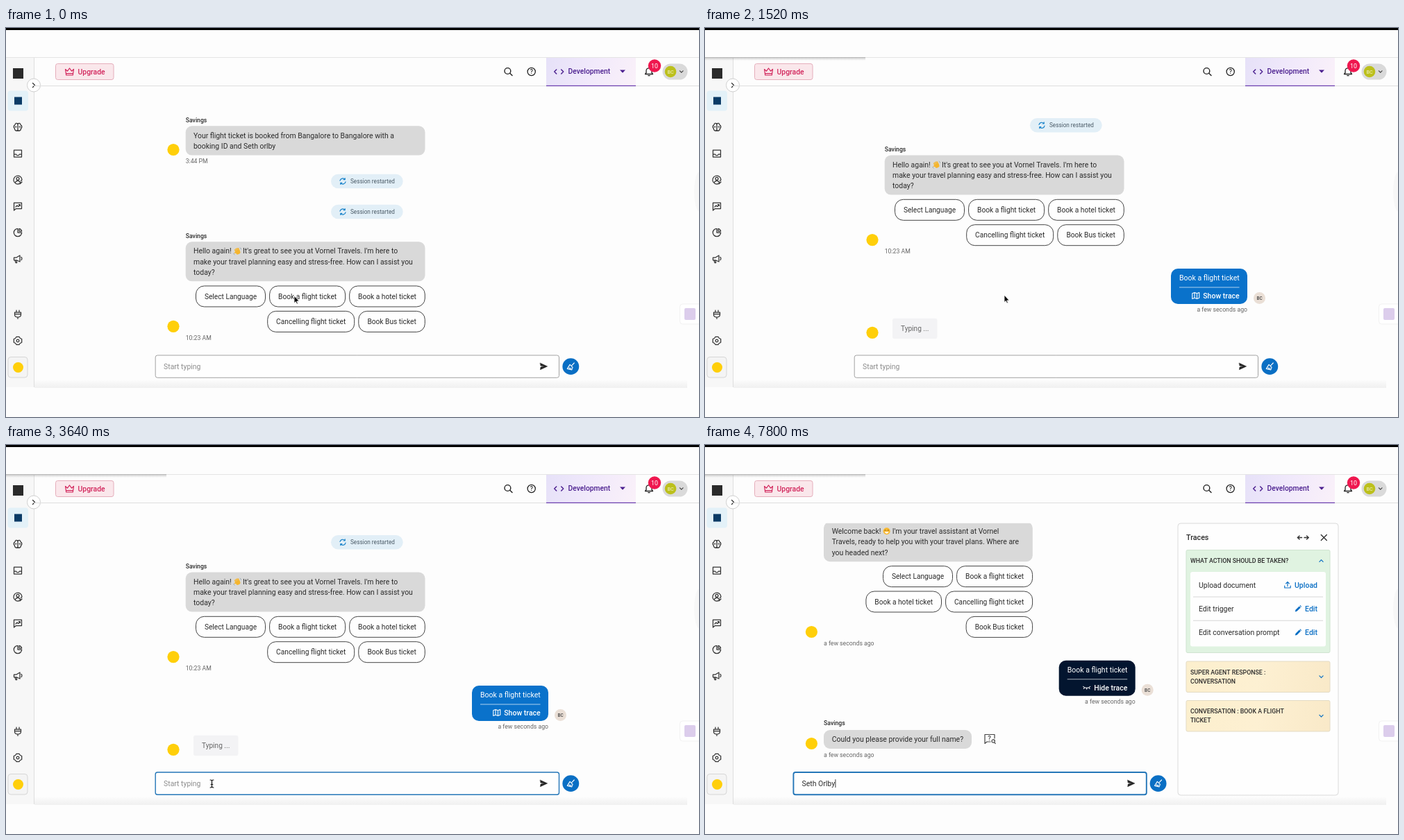
Animation of 998 by 561 pixels, one loop 8 s. Source, as an HTML page with a canvas:

```html
<!DOCTYPE html>
<html lang="en">
<head>
<meta charset="utf-8">
<title>Chat preview</title>
<style>
html, body { margin: 0; width: 100%; height: 100%; overflow: hidden; background: #fdfdfd; }
canvas { display: block; width: 998px; height: 561px; }
</style>
</head>
<body>
<canvas id="stage"></canvas>
<script>
const W = 998, H = 561, LOOP = 8000, STEP = 40;
const cv = document.getElementById('stage');
const c = cv.getContext('2d');
const dpr = window.devicePixelRatio || 1;
cv.width = W * dpr;
cv.height = H * dpr;

const INK = '#2b2b2b', GREY = '#666', BLUE = '#0a6fc4', YELLOW = '#ffcf0a', BUBBLE = '#d9d9d9';

// ---------- helpers ----------
function text(s, x, y, size, color = INK, weight = 400, align = 'left') {
  c.font = `${weight} ${size}px Roboto, sans-serif`;
  c.textAlign = align;
  c.fillStyle = color;
  c.fillText(s, x, y + size * 0.355);
  return c.measureText(s).width;
}
function box(x, y, w, h, r, fill, stroke, lw = 1) {
  c.beginPath();
  c.roundRect(x, y, w, h, r);
  if (fill) { c.fillStyle = fill; c.fill(); }
  if (stroke) { c.strokeStyle = stroke; c.lineWidth = lw; c.stroke(); }
}
function dot(x, y, r, fill, stroke, lw = 1) {
  c.beginPath();
  c.arc(x, y, r, 0, 7);
  if (fill) { c.fillStyle = fill; c.fill(); }
  if (stroke) { c.strokeStyle = stroke; c.lineWidth = lw; c.stroke(); }
}
function icon(d, x, y, stroke, lw = 1.2, fill) {
  const p = new Path2D(d);
  c.save();
  c.translate(x, y);
  c.lineJoin = c.lineCap = 'round';
  if (fill) { c.fillStyle = fill; c.fill(p); }
  if (stroke) { c.strokeStyle = stroke; c.lineWidth = lw; c.stroke(p); }
  c.restore();
}
function line(x1, y1, x2, y2, color, lw = 1) {
  c.beginPath();
  c.moveTo(x1, y1);
  c.lineTo(x2, y2);
  c.strokeStyle = color;
  c.lineWidth = lw;
  c.stroke();
}
function gradient(x1, y1, x2, y2, ...stops) {
  const g = c.createLinearGradient(x1, y1, x2, y2);
  stops.forEach((s, i) => g.addColorStop(i / (stops.length - 1), s));
  return g;
}

// ---------- page frame ----------
const NAV = [
  [143, 'M0-5.5V5.5M0-4C-1-6.5-4-6-4-3.2C-6.5-2.5-6.3 1-4.6 1.6C-5 4.5-1.5 6.5 0 4.2C1.5 6.5 5 4.5 4.6 1.6C6.3 1 6.5-2.5 4-3.2C4-6 1-6.5 0-4M-4-.5H-2M2-.5H4'],
  [181, 'M-5.5-5H5.5V5H-5.5ZM-5.5 1H-2.3C-2 3.4 2 3.4 2.3 1H5.5'],
  [219, 'M4.5 4A6 6 0 1 1 6 0L4.5 1.5M-2-1.7A2 2 0 1 1 2-1.7A2 2 0 1 1-2-1.7M-3.3 3.5C-2.5 .6 2.5 .6 3.3 3.5M3.5 5.5L6 3'],
  [257, 'M-5.5-5H5.5V3.5H-2.5L-5.5 6ZM-3 1L-1-1L.7 .6L3.2-2.2M1.3-2.4H3.3V-.4'],
  [295, 'M0-5.7A5.7 5.7 0 1 0 5.7 0H0ZM2-5.7A5 5 0 0 1 5.7-2H2Z'],
  [333, 'M-5.5-2H-2L3-5V4L-2 1.8H-5.5ZM-4 2L-3 5.5H-1.3L-2 2M5-2.5C6.2-1.5 6.2 .7 5 1.7'],
  [413, 'M-2-6V-3M2-6V-3M-4.5-3H4.5V.5C4.5 3 2 4 0 4C-2 4-4.5 3-4.5 .5ZM-4.5-.5H4.5M0 4V6.3'],
  [451, 'M-2-5.7H2L3.2-3.7L5.7-2.5V2.5L3.2 3.7L2 5.7H-2L-3.2 3.7L-5.7 2.5V-2.5L-3.2-3.7ZM-1.8 0A1.8 1.8 0 1 1 1.8 0A1.8 1.8 0 1 1-1.8 0']
];

function sidebar() {
  c.fillStyle = '#f7f7f7';
  c.fillRect(0, 43, 40, 475);
  line(40.5, 43, 40.5, 518, '#dedede');
  box(10, 58, 15, 15, 0, '#2a2a2a');
  box(2.5, 90.5, 29.5, 29, 4, '#e3f1f8');
  box(12, 99.5, 11, 11, 0, '#0b3b66');
  NAV.forEach(([y, d]) => icon(d, 17, y, '#333', 1.25));
  box(3, 474.5, 28, 29.5, 4, '#f4f4f4', '#d6d6d6');
  dot(17.5, 489.5, 7.5, YELLOW);
  dot(40, 82.5, 9.5, '#fff', '#cfcfcf');
  icon('M-1.5-3L1.5 0L-1.5 3', 40, 82.5, '#333', 1.3);
}

function header() {
  line(0, 42.5, W, 42.5, '#e4e4e4');
  line(40, 83.5, W, 83.5, '#dedede');
  box(71.5, 51.5, 83.5, 23, 3, '#fae7eb', '#e5aebb');
  icon('M-6-3.5L-3-.8L0-5L3-.8L6-3.5L4.8 5H-4.8ZM-4.6 2.6H4.6', 91.5, 63, '#d2265c', 1.2);
  text('Upgrade', 103.5, 63, 10.4, '#d2265c', 500);

  icon('M-5-1A4.4 4.4 0 1 1 3.8-1A4.4 4.4 0 1 1-5-1M2.7 2.3L6 5.6', 723, 63, '#222', 1.4);
  dot(756.7, 63, 5.6, null, '#222', 1.3);
  text('?', 756.7, 63.2, 8.5, '#222', 500, 'center');

  c.fillStyle = gradient(778, 43, 907, 83, '#e6e1f8', '#f1e9fb', '#faf1f9');
  c.fillRect(778, 43, 129, 40);
  line(778, 83.3, 907, 83.3, '#6b3fae', 1.2);
  icon('M-3.5-3L-6.5 0L-3.5 3M3.5-3L6.5 0L3.5 3', 796.2, 63, '#4b1f8f', 1.5);
  text('Development', 809.5, 62.7, 10.3, '#4b1f8f', 500);
  icon('M-4-2H4L0 2.2Z', 888, 62.5, null, 0, '#4b1f8f');

  icon('M-5.5 3.5H5.5L4 1.5V-1.5C4-6.3-4-6.3-4-1.5V1.5ZM-1.2 5.6H1.2', 926, 63, '#222', 1.3);
  dot(934, 54.5, 9.2, '#ef174f');
  text('10', 934, 54.5, 8.8, '#fff', 400, 'center');
  box(945.5, 51.5, 36, 23, 11.5, '#dadada');
  dot(957, 63, 8.3, '#bcc01c');
  text('BC', 957, 63, 7.2, '#f3f3d0', 400, 'center');
  icon('M-2.3-1.2L0 1.2L2.3-1.2', 972.7, 63, '#444', 1.2);
}

function frame(t) {
  c.fillStyle = '#fdfdfd';
  c.fillRect(0, 0, W, H);
  c.fillStyle = '#000';
  c.fillRect(0, 0, W, 3);
  c.fillStyle = gradient(0, 507, 0, 519, 'rgba(238,238,238,0)', '#f0f0f0');
  c.fillRect(41, 507, 940, 12);
  sidebar();
  header();
  if (t >= 40) {
    c.fillStyle = gradient(0, 42, 0, 47, 'rgba(120,120,120,.45)', 'rgba(160,160,160,0)');
    c.fillRect(0, 42, 231, 5);
  }
  c.beginPath();
  c.ellipse(999, 236, 8, 29, 0, 0, 7);
  c.fillStyle = '#f7f7f7';
  c.fill();
  box(970.5, 398, 32, 29, 4, '#fff', '#f1f1f1');
  box(977, 404, 16, 17, 2, '#dccdec');
}

// ---------- chat parts ----------
function wave(x, y) {
  c.save();
  c.translate(x, y);
  c.rotate(-0.45);
  box(-3, -1, 6.6, 6, 2.6, '#f5b52e');
  [-2.9, -1.1, 0.7, 2.3].forEach((fx, i) => box(fx, -4.6 + Math.abs(i - 1.4) * 0.6, 1.5, 5.5, 0.8, '#f5b52e'));
  box(-5, 0, 3.6, 1.7, 0.8, '#f5b52e');
  c.restore();
  icon('M4.2-4.8Q5.6-4 5.6-2.6M-5.2 3.4Q-5 4.8-3.8 5.3', x, y, '#7f97a5', 0.7);
}
function smile(x, y) {
  dot(x, y, 5, '#f8b92f');
  icon('M-3-1.2Q-2.1-2.6-1.2-1.2M1.2-1.2Q2.1-2.6 3-1.2', x, y, '#6b3d12', 0.8);
  icon('M-3 .7H3Q2.2 3.6 0 3.6Q-2.2 3.6-3 .7Z', x, y, null, 0, '#fff3df');
}

// Message text; an emoji inside a line is drawn as a small figure.
function paragraph(lines, x, y) {
  lines.forEach((s, i) => {
    const ly = y + i * 15.3;
    const [a, emoji, b] = s.split(/([👋😊])/u);
    const w = text(a, x, ly, 10.45);
    if (!emoji) return;
    (emoji === '👋' ? wave : smile)(x + w + 5.5, ly);
    text(b, x + w + 11, ly, 10.45);
  });
}
const note = (s, x, y, align) => text(s, x, y, 8.7, GREY, 400, align);
const botName = (x, y) => text('Savings', x, y, 8.7, INK, 500);
const botFace = (x, y) => dot(x, y, 8.6, YELLOW);

function pill(y) {
  box(468, y - 10.3, 103.7, 20.6, 10.3, '#e2eff7');
  icon('M-4-.8A4 4 0 0 1 3-2.6M4 .8A4 4 0 0 1-3 2.6M3.2-4.4V-2.3H1.2M-3.2 4.4V2.3H-1.2', 485, y, '#1681c9', 1.2);
  text('Session restarted', 496, y - 0.2, 8.2, '#4a5a66');
}

const CHIPS = {
  'Select Language': 100, 'Book a flight ticket': 109, 'Book a hotel ticket': 108.6,
  'Cancelling flight ticket': 125, 'Book Bus ticket': 95.5
};
function chips(rows, right, y, hover) {
  rows.forEach((row, i) => {
    let x = right;
    [...row].reverse().forEach(name => {
      const w = CHIPS[name], cy = y + i * 36.4;
      box(x - w, cy, w, 30, 12, name === hover ? '#e3f2f9' : '#fefefe', '#444', 1);
      text(name, x - w / 2, cy + 15, 10.2, INK, 400, 'center');
      x -= w + 6.1;
    });
  });
}

const names = Object.keys(CHIPS);
const HELLO_WIDE = ["Hello again! 👋 It's great to see you at Vornel Travels. I'm here to",
  'make your travel planning easy and stress-free. How can I assist you', 'today?'];
const HELLO = ["Hello again! 👋 It's great to see you at Vornel Travels. I'm",
  'here to make your travel planning easy and stress-free. How', 'can I assist you today?'];
const WELCOME = ["Welcome back! 😊 I'm your travel assistant at Vornel",
  'Travels, ready to help you with your travel plans. Where are', 'you headed next?'];

function greeting(dy, hover) {
  botName(258.7, 300 + dy);
  box(258.7, 308.3 + dy, 344.8, 57, 9, BUBBLE);
  paragraph(HELLO_WIDE, 270, 321.6 + dy);
  chips([names.slice(0, 3), names.slice(3)], 603.3, 372 + dy, hover);
  botFace(241, 430.3 + dy);
  note('10:23 AM', 258.7, 447 + dy);
}

function userMessage(x, y, color, action, mark) {
  box(x, y, 110, 51, 10, color);
  text('Book a flight ticket', x + 12, y + 13.2, 10.5, '#fff');
  line(x + 12, y + 27, x + 98.5, y + 27, 'rgba(255,255,255,.75)', 0.9);
  const w = text(action, x + 98.7, y + 39, 10.5, '#fff', 500, 'right');
  icon(mark, x + 88.2 - w, y + 39, '#fff', 1.1);
  dot(x + 127.5, y + 42.5, 8.5, '#eadfd6');
  text('BC', x + 127.5, y + 42.6, 6.4, '#444', 500, 'center');
  note('a few seconds ago', x + 110, y + 59, 'right');
}
const MAP = 'M-5-3.2L-1.7-4.4L1.7-3.2L5-4.4V3.3L1.7 4.5L-1.7 3.3L-5 4.5ZM-1.7-4.4V3.3M1.7-3.2V4.5';
const LASH = 'M-5-1.5C-3 1.3 3 1.3 5-1.5M-3.3 .2L-4.3 1.7M0 .6V2.5M3.3 .2L4.3 1.7';

// ---------- trace panel ----------
function accordion(y, l1, l2) {
  box(693, y, 207, 44.5, 2, gradient(693, y, 900, y + 44, '#fcefcd', '#fdf0d2', '#f9e9c8'), '#e3dbc4');
  text(l1, 699, y + 15.4, 8.8, INK, 500);
  text(l2, 699, y + 28.6, 8.8, INK, 500);
  icon('M-2.6-1.4L0 1.4L2.6-1.4', 887.5, y + 22.3, BLUE, 1.2);
}
const PENCIL = 'M-4.2 4.2L-3.6 1.6L1.8-3.8L3.8-1.8L-1.6 3.6ZM2.4-4.4L3.2-5.1L5-3.2L4.3-2.4Z';
const UPLOAD = 'M-4.2 1.2V4H4.2V1.2M0 1.6V-4.4M-2.4-2.2L0-4.6L2.4-2.2';

function traces() {
  box(681, 113, 231, 392, 4, '#fefefe', '#dadada');
  text('Traces', 693, 133.5, 10.7, INK, 500);
  icon('M-1.7 0H-8M-5.2-2.6L-8 0L-5.2 2.6M1.7 0H8M5.2-2.6L8 0L5.2 2.6', 861.3, 133.5, '#333', 1.3);
  icon('M-4-4L4 4M4-4L-4 4', 891.3, 133.5, '#333', 1.4);
  box(693, 151.5, 207, 148, 2, '#e0f3e1', '#cfe3d0');
  text('WHAT ACTION SHOULD BE TAKEN?', 699, 166.5, 8.8, INK, 500);
  icon('M-2.6 1.4L0-1.4L2.6 1.4', 887.5, 167, BLUE, 1.2);
  box(699, 183, 195, 107.5, 3, '#fefefe');
  [['Upload document', 'Upload'], ['Edit trigger', 'Edit'], ['Edit conversation prompt', 'Edit']].forEach(([a, b], i) => {
    const y = 202 + i * 34.2, up = b === 'Upload';
    text(a, 711, y, 10.45);
    const w = text(b, 882, y, 10.5, BLUE, 500, 'right');
    if (up) icon(UPLOAD, 872 - w, y, BLUE, 1.2);
    else icon(PENCIL, 872 - w, y, null, 0, BLUE);
    if (i < 2) line(703, y + 17, 890, y + 17, '#d6d6d6');
  });
  accordion(312, 'SUPER AGENT RESPONSE :', 'CONVERSATION');
  accordion(368.5, 'CONVERSATION : BOOK A FLIGHT', 'TICKET');
}

// ---------- input ----------
const KEYS = [5840, 6000, 6280, 6560, 6800, 6920, 7080, 7320, 7480, 7640];
const TYPED = 'Seth Orlby';

function inputBar(x, w, t) {
  const focus = (t >= 1000 && t < 1480) || t >= 4800;
  const hover = t >= 2840 && t < 4800;
  const lw = focus ? (t < 1040 ? 1.4 : 1.9) : hover ? 1.4 : 1;
  box(x, 472, w, 32.3, 3, '#fefefe', focus || hover ? '#2476b8' : '#a3a3a3', lw);
  const tx = x + 12.2, n = KEYS.filter(k => k <= t).length;
  let cx = tx + 0.3;
  if (n) cx = tx + 0.8 + text(TYPED.slice(0, n), tx, 488, 10.45);
  else text('Start typing', tx - 0.3, 488.2, 10.4, '#8d8d8d');
  const blinkOff = t >= 5000 && t < 5520;
  if (focus && t >= 1040 && !blinkOff) line(cx, 482.2, cx, 494, '#222', 0.9);
  icon('M-4.8-4.8L5.5 0L-4.8 4.8L-4.2 1L1 0L-4.2-1Z', x + w - 22.3, 488, '#222', 0.5, '#222');
  dot(x + w + 16.8, 488.2, 11.9, BLUE);
  icon('M5-5.2L1.6-1.6M-1.2-2.8L2.8 1.2L1.4 4.8L-5 3.2ZM-2.2 1.6L-1.4 3.6M.2 2.2L-.2 4', x + w + 16.8, 488.2, '#fff', 1.1);
}

// ---------- scenes ----------
function wideChat(t) {
  if (t < 1480) {
    botName(258.7, 133);
    box(258.7, 141.3, 344.8, 42.3, 9, BUBBLE);
    paragraph(['Your flight ticket is booked from Bangalore to Bangalore with a', 'booking ID and Seth orlby'], 270, 155);
    botFace(241, 175.5);
    note('3:44 PM', 258.7, 191.7);
    pill(221);
    pill(265);
    greeting(0, t >= 240 ? 'Book a flight ticket' : '');
  } else {
    pill(140.3);
    greeting(-124.7);
    userMessage(671, 347, '#0a72cb', 'Show trace', MAP);
    botFace(241, 439.3);
    box(270, 418.7, 64.5, 29.5, 3, '#f3f3f5');
    text('Typing ...', 282, 433.6, 10.1, GREY);
  }
  inputBar(215.2, 581.3, t);
}

function tracedChat(t) {
  const fresh = t >= 5320;
  c.save();
  c.beginPath();
  c.rect(100, 112.8, 560, 380);
  c.clip();
  box(171, 110.8, 300.8, 57.4, 9, BUBBLE);
  c.restore();
  paragraph(fresh ? WELCOME : HELLO, 182.7, 124.3);
  chips([names.slice(0, 2), names.slice(2, 4), names.slice(4)], 471.6, 174.6);
  botFace(153.4, 269.5);
  note(fresh ? 'a few seconds ago' : '10:23 AM', 171, 286);
  userMessage(509.7, 310.8, '#03152f', 'Hide trace', LASH);
  botName(171, 401);
  box(171, 411, 213, 27, 9, BUBBLE);
  paragraph(['Could you please provide your full name?'], 182.7, 424.2);
  botFace(153.4, 430.5);
  note('a few seconds ago', 171, 447);
  icon('M7-1V-6.5H-7V6.5L-4 4H1M3 3A2.2 2.2 0 1 1 7.4 3A2.2 2.2 0 1 1 3 3M6.8 4.8L8.2 6.6', 410, 424, '#444', 1.2);
  text('?', 409.5, 423, 9.5, '#444', 500, 'center');
  inputBar(127.4, 508.4, t);
  traces();
}

// ---------- pointer ----------
const TRACK = [[200, 415, 386.5], [840, 431, 384.5], [2040, 431, 386], [2240, 376.3, 433],
  [2400, 376.3, 433], [2520, 345, 458], [2720, 345, 458], [3080, 296.5, 488.5]];

function pointerAt(t) {
  let i = TRACK.findIndex(k => k[0] > t);
  if (i === 0) return TRACK[0].slice(1);
  if (i < 0) return TRACK[TRACK.length - 1].slice(1);
  const [t0, x0, y0] = TRACK[i - 1], [t1, x1, y1] = TRACK[i];
  const u = (t - t0) / (t1 - t0), e = u * u * (3 - 2 * u);
  return [x0 + (x1 - x0) * e, y0 + (y1 - y0) * e];
}
function pointer(t) {
  if (t >= KEYS[0]) return;
  const [x, y] = pointerAt(t);
  if (y > 472) {
    icon('M-2.4-5.5Q0-5.5 0-4V4Q0 5.5-2.4 5.5M2.4-5.5Q0-5.5 0-4M0 4Q0 5.5 2.4 5.5M-1.3 1H1.3', x, y, '#111', 1.2);
  } else if (t >= 240 && t < 1480) {
    icon('M-1.6 7V1.2C-1.6-.3 .4-.3 .4 1.2V5C1.2 4.2 2 4.5 2.2 5.2C3 4.6 3.8 5 4 5.8C4.8 5.3 5.6 5.8 5.6 6.8V9.5C5.6 11 4.8 12 4.6 13.4H-.8C-1.2 11.6-3.4 9.6-4 7.8C-4 6.6-2.6 6.4-1.6 7.8Z', x, y, '#111', 0.9, '#fff');
  } else {
    icon('M0 0V10.2L2.3 8.1L3.8 11.6L5.4 10.9L3.9 7.5H7Z', x, y, '#fff', 0.8, '#000');
  }
}

function draw(now) {
  const t = Math.floor((now % LOOP) / STEP) * STEP;
  c.setTransform(dpr, 0, 0, dpr, 0, 0);
  frame(t);
  (t < 4800 ? wideChat : tracedChat)(t);
  pointer(t);
}
const start = performance.now();
function tick() {
  draw(performance.now() - start);
  requestAnimationFrame(tick);
}
tick();
</script>
</body>
</html>
```
